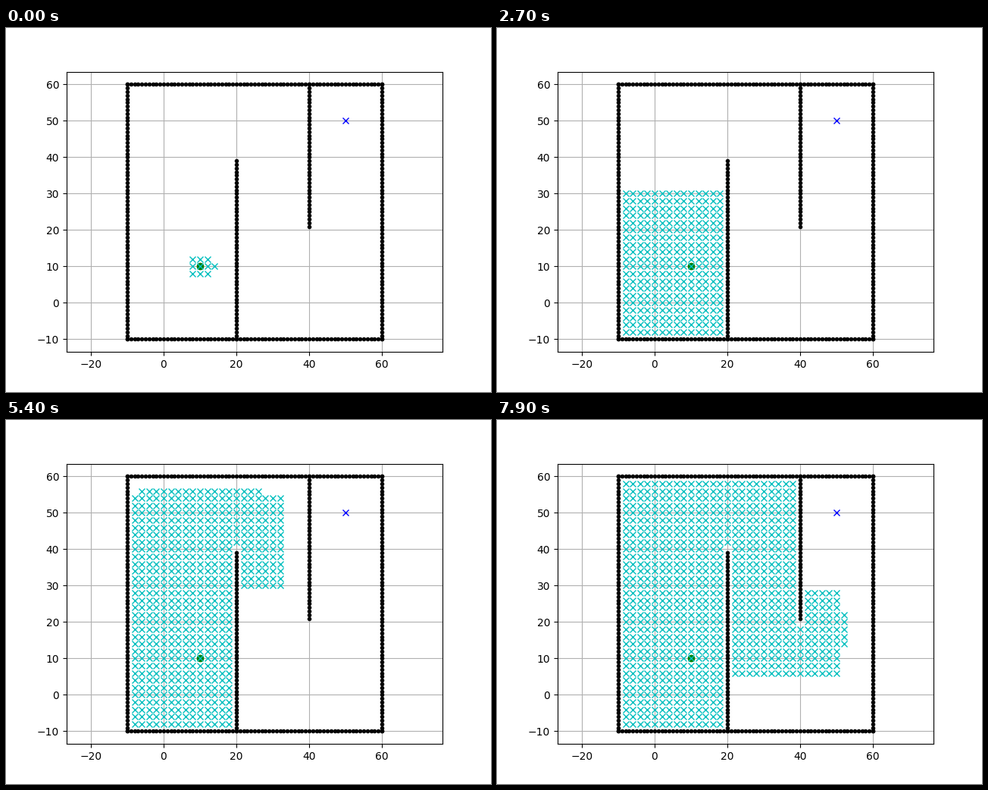
These frames come from a looping animation (640 px wide and 480 px high, 8000 ms). A matplotlib script:

```python
"""Breadth-first search spreading through a walled room."""
from collections import deque

import matplotlib.pyplot as plt
import numpy as np
from matplotlib.animation import FuncAnimation

FRAMES, INTERVAL = 80, 100
NODES_PER_FRAME = 10
STEP, RADIUS = 2, 1.0
LOW, HIGH = -10, 60
START, GOAL = (10, 10), (50, 50)
MOVES = [(1, 0), (0, 1), (-1, 0), (0, -1),
         (-1, -1), (-1, 1), (1, -1), (1, 1)]


def build_walls():
    side = range(LOW, HIGH + 1)
    walls = [(i, LOW) for i in side] + [(HIGH, i) for i in side]
    walls += [(i, HIGH) for i in side] + [(LOW, i) for i in side]
    walls += [(20, i) for i in range(LOW, 40)]
    walls += [(40, i) for i in range(HIGH, 20, -1)]
    return np.array(walls)


def search(walls, limit):
    """Return the first `limit` cells in the order they are visited."""
    def is_free(cell):
        inside = all(LOW <= v < HIGH for v in cell)
        return inside and np.hypot(*(walls - cell).T).min() > RADIUS

    queue, seen, order = deque([START]), {START}, []
    while queue and len(order) < limit:
        x, y = queue.popleft()
        order.append((x, y))
        for dx, dy in MOVES:
            cell = (x + STEP * dx, y + STEP * dy)
            if cell not in seen and is_free(cell):
                seen.add(cell)
                queue.append(cell)
    return np.array(order)


walls = build_walls()
visited = search(walls, FRAMES * NODES_PER_FRAME)

fig, ax = plt.subplots(figsize=(6.4, 4.8), dpi=100)
ax.plot(*walls.T, ".k")
ax.plot(*START, "og")
ax.plot(*GOAL, "xb")
ax.grid(True)
ax.axis("equal")
marks, = ax.plot([], [], "xc")


def update(frame):
    marks.set_data(*visited[:(frame + 1) * NODES_PER_FRAME].T)
    return marks,


anim = FuncAnimation(fig, update, frames=FRAMES, interval=INTERVAL, repeat=True)
plt.show()
```
